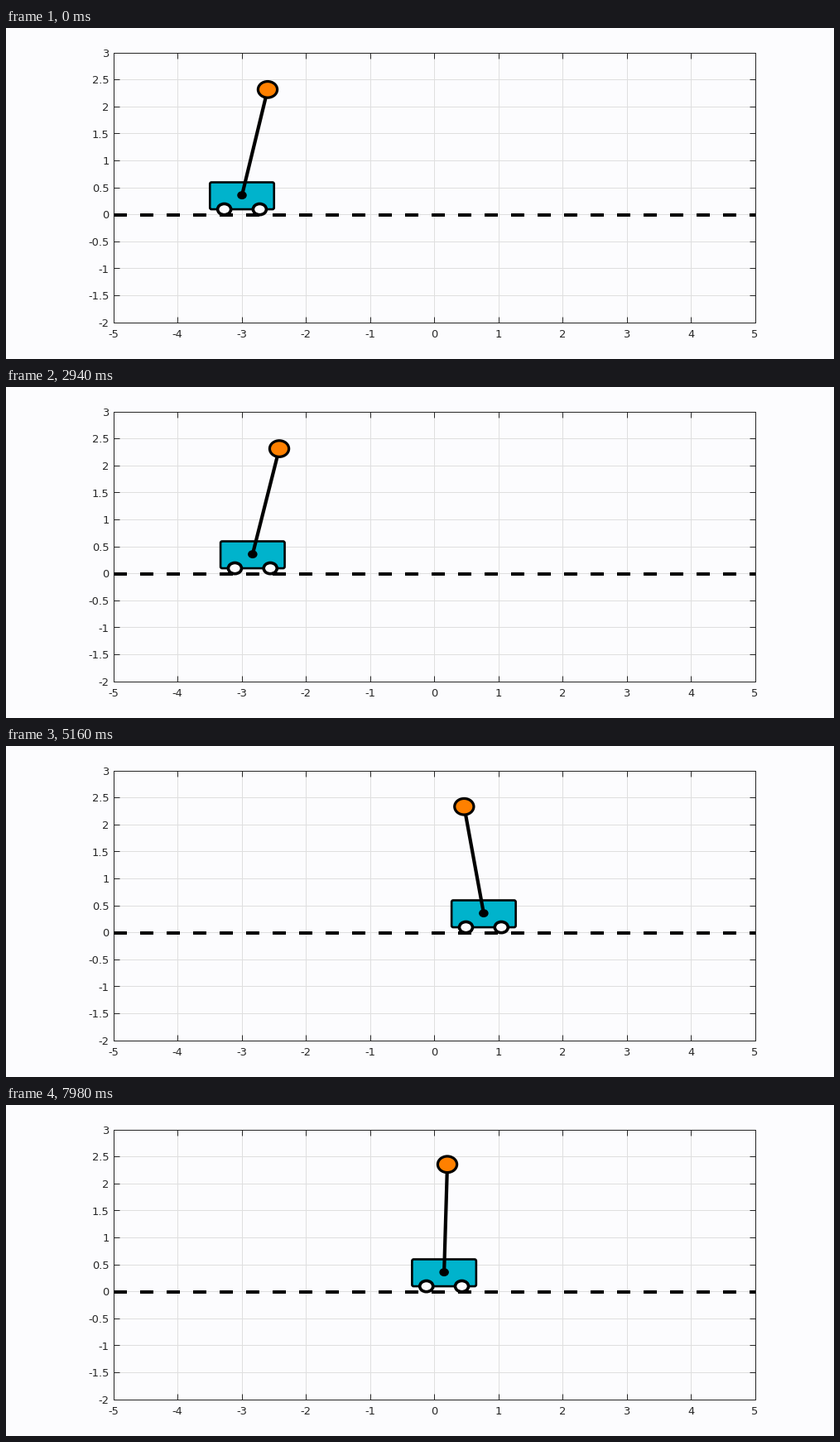
Recreate the animation shown at these times as a matplotlib script. Size 1000x400 px, loop 8 s.

```python
import numpy as np
import matplotlib.pyplot as plt
from matplotlib.animation import FuncAnimation
from matplotlib.collections import LineCollection
from matplotlib.patches import Ellipse, FancyBboxPatch

W, H, DPI = 1000, 400, 100
PT = 72 / DPI                      # one pixel in points
FRAMES, STEP = 400, 20
LEFT, RIGHT, TOP, BOTTOM = 130, 905, 30, 356
UX, UY = 77.5, 65.2                # pixels per data unit
PIVOT, LENGTH, AXLE = 0.36, 2.0, 0.1

PAPER, INK, BLACK, GRID = "#fcfcfe", "#262626", "#000000", "#dfdfdf"
BODY, BOB = "#00b3cc", "#ff8000"

# Turning points as (seconds, value): the cart's place and the bob's offset.
CART = [(0, -3), (.95, .86), (1.8, .29), (2.19, 1.27), (3.03, -2.97),
        (3.57, -2.39), (4.52, -3.33), (5.48, 2.2), (6.15, 1.15),
        (6.64, 1.93), (7.98, .15)]
LEAN = [(0, .4), (.84, -.31), (1.5, .05), (2.22, -.51), (2.9, .42),
        (3.62, -.1), (4.68, .51), (5.33, -.47), (6.02, .11),
        (6.56, -.17), (7.04, .01), (7.98, .05)]


def swing(turns, t):
    """Ease in and out from each turning point to the next."""
    x, y = np.transpose(turns)
    i = np.clip(np.searchsorted(x, t, side="right") - 1, 0, len(x) - 2)
    s = (t - x[i]) / (x[i + 1] - x[i])
    return y[i] + (y[i + 1] - y[i]) * s * s * (3 - 2 * s)


def px(x):
    return LEFT + (x + 5) * UX


def py(y):
    return TOP + (3 - y) * UY


def pixel(v):
    return np.floor(v) + 0.5


fig = plt.figure(figsize=(W / DPI, H / DPI), dpi=DPI, facecolor=PAPER)
ax = fig.add_axes([0, 0, 1, 1])
ax.set_xlim(0, W)
ax.set_ylim(H, 0)
ax.axis("off")


def add_lines(segments, color, z):
    ax.add_collection(LineCollection(segments, colors=color, linewidths=PT,
                                     zorder=z, snap=False))


def label(x, y, value, align):
    ax.text(x, y, f"{value:g}", ha=align, va="baseline", color=INK,
            family="DejaVu Sans", size=13 * PT)


def ellipse(y, rx, ry, fill, lw, z):
    return ax.add_patch(Ellipse((0, y), 2 * rx, 2 * ry, fc=fill, ec=BLACK,
                                lw=lw * PT, zorder=z))


# grid, frame, ticks and labels
l, r, t, b = pixel(LEFT), pixel(RIGHT), pixel(TOP), pixel(BOTTOM)
grid = []
edges = [[(l, t), (r, t)], [(l, b), (r, b)], [(l, t), (l, b)], [(r, t), (r, b)]]
for x in np.arange(-5, 6):
    p = pixel(px(x))
    grid.append([(p, t), (p, b)])
    edges += [[(p, t), (p, t + 7)], [(p, b), (p, b - 7)]]
    label(px(x) - 0.5, 374, x, "center")
for y in np.arange(-2, 3.5, 0.5):
    p = pixel(py(y))
    grid.append([(l, p), (r, p)])
    edges += [[(l, p), (l + 7, p)], [(r, p), (r - 7, p)]]
    label(124.6, py(y) + 4.8, y, "right")
add_lines(grid, GRID, 1)
add_lines(edges, INK, 2)

# ground
ax.plot([LEFT, RIGHT], [226, 226], color=BLACK, lw=4 * PT,
        ls=(0, (4, 4)), dash_capstyle="butt", zorder=3)

# cart and pendulum
body = ax.add_patch(FancyBboxPatch(
    (0, py(0.6)), UX, 0.5 * UY, boxstyle="round,pad=0,rounding_size=2",
    fc=BODY, ec=BLACK, lw=2.6 * PT, zorder=4))
wheels = [ellipse(py(AXLE), 8, 6.6, PAPER, 3.6, 5) for _ in range(2)]
pole, = ax.plot([], [], color=BLACK, lw=4.2 * PT, solid_capstyle="round",
                zorder=6)
hub = ellipse(py(PIVOT), 5, 4.2, BLACK, 1.5, 7)
bob = ellipse(0, 11.6, 9.8, BOB, 3.2, 8)


def draw(n):
    sec = n * STEP / 1000
    x, dx = swing(CART, sec), swing(LEAN, sec)
    cx, cy = px(x), py(PIVOT)
    bx = px(x + dx)
    by = cy - np.sqrt(LENGTH ** 2 - dx ** 2) * UY
    body.set_x(cx - UX / 2)
    for wheel, side in zip(wheels, (-1, 1)):
        wheel.center = (cx + side * 21.4, py(AXLE))
    pole.set_data([cx, bx], [cy, by])
    hub.center = (cx, cy)
    bob.center = (bx, by)
    return body, *wheels, pole, hub, bob


anim = FuncAnimation(fig, draw, frames=FRAMES, interval=STEP, repeat=True,
                     repeat_delay=0, blit=False)
plt.show()
```
